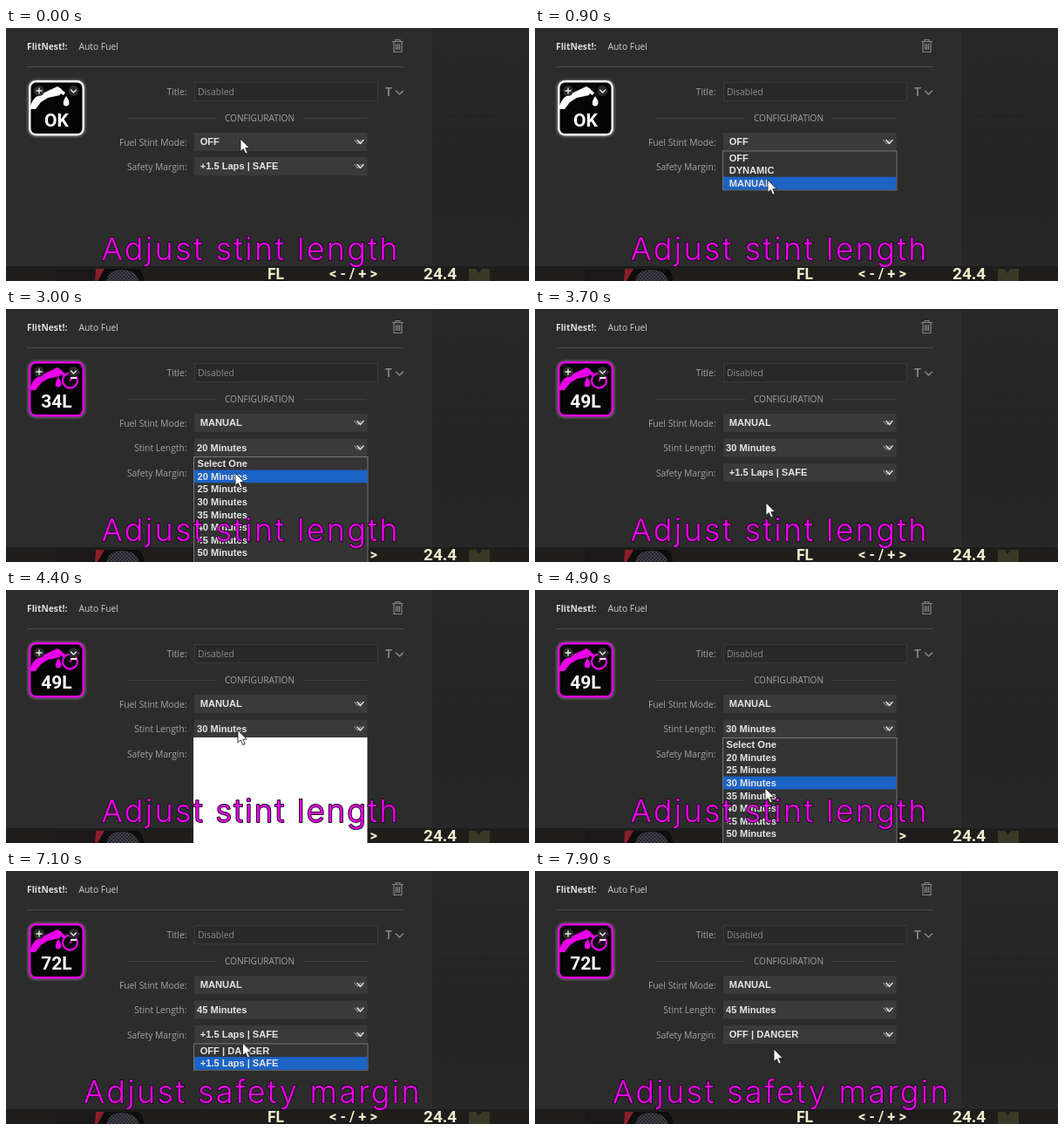
An HTML page for the animation above (8000 ms loop, 600 by 290 pixels).

```html
<!DOCTYPE html>
<html lang="en">
<head>
<meta charset="utf-8">
<title>Stint settings</title>
<style>
  html, body { margin: 0; width: 100%; height: 100%; overflow: hidden; background: #1e1d1c; }
  svg { display: block; width: 600px; height: 290px; }
  .ui { font: 500 10.3px "Open Sans", "Noto Sans", sans-serif; fill: #a4a4a4; }
  .end { text-anchor: end; }
  .mid { text-anchor: middle; }
  .name { font-weight: 700; fill: #dedede; }
  .sel { font: bold 11.1px "Liberation Sans", Arial, sans-serif; fill: #e6e6e6; }
  .hud { font: bold 17.5px Roboto, sans-serif; fill: #efeecb; }
  .key { font: bold 21px Roboto, sans-serif; fill: #fff; text-anchor: middle; }
  .cap { font: 350 36px Inter, sans-serif; letter-spacing: 2.3px; fill: #f000f0;
         stroke: #220a22; stroke-width: 2px; stroke-linejoin: round; paint-order: stroke; }
  .line { fill: none; stroke-linecap: round; stroke-linejoin: round; }
</style>
</head>
<body>
<svg viewBox="0 0 600 290">
  <defs>
    <linearGradient id="side" x1="0" y1="0" x2="0" y2="1">
      <stop offset="0" stop-color="#282828"/>
      <stop offset=".65" stop-color="#252525"/>
      <stop offset="1" stop-color="#272727"/>
    </linearGradient>
    <pattern id="hatch" width="4" height="4" patternUnits="userSpaceOnUse">
      <rect width="4" height="4" fill="#25252a"/>
      <path d="M0 0h2v2h-2zM2 2h2v2h-2z" fill="#3f4048"/>
    </pattern>
    <clipPath id="face"><rect x="28" y="62" width="60" height="60" rx="6"/></clipPath>
    <filter id="soft" x="-20%" y="-20%" width="140%" height="140%"><feGaussianBlur stdDeviation="1"/></filter>
  </defs>

  <!-- backdrop and head-up display -->
  <rect width="600" height="290" fill="#1e1d1c"/>
  <rect x="490" width="110" height="273" fill="url(#side)"/>
  <path d="M490 101h110M490 118h110M490 137h110M490 154h110" stroke="#222"/>
  <rect x="57" y="276" width="45" height="14" fill="#1a1818"/>
  <path d="M103 276h49q6 5 6 14h-56z" fill="#0e0d0e"/>
  <path d="M103 276h10l-8 14h-3z" fill="#8a1f28"/>
  <path d="M115 290q3-13 18-13t20 13z" fill="url(#hatch)"/>
  <path d="M531 290v-14h8l3 5 4-5h9v14z" fill="#3a3928"/>
  <g class="hud">
    <text x="300" y="287.5">FL</text>
    <text x="398.500" y="286.500" class="mid" style="font-size:16.500px">&lt; - / + &gt;</text>
    <text x="479" y="287.500" style="font-size:19px">24.4</text>
  </g>

  <!-- settings panel -->
  <rect width="490" height="273" fill="#2d2c2c"/>
  <path d="M489.500 0V273" stroke="#262626"/>
  <text x="24" y="24.500" class="ui name">FlitNest!:</text>
  <text x="83.500" y="24.500" class="ui" style="fill:#d2d2d2">Auto Fuel</text>
  <g class="line" stroke="#858585" stroke-width="1.200">
    <path d="M443.500 15.500h12M447 15.500v-2h5v2M445 15.500v12h9v-12M447.500 18.500v6M449.500 18.500v6M451.500 18.500v6"/>
    <path d="M447.500 72l4 4 4-4" stroke-width="1.600"/>
  </g>
  <path d="M24 44.500H457" stroke="#4d4c4c"/>
  <text x="207.500" y="77" class="ui end">Title:</text>
  <rect x="216.500" y="62.500" width="210" height="21" fill="#2a2929" stroke="#3a3939"/>
  <text x="220" y="77" class="ui" style="fill:#8b8b8b">Disabled</text>
  <text x="435" y="77.500" class="ui" style="font-size:14px;font-weight:600;fill:#8c8c8c">T</text>
  <path d="M139 103.500H241M341 103.500H414" stroke="#424141"/>
  <text x="291" y="107" class="ui mid" style="font-size:10.100px">CONFIGURATION</text>

  <g id="live"></g>
</svg>
<script>
const LOOP = 8000, STEP = 100, ROW = 14.6, PINK = "#e800e8";
const live = document.getElementById("live");

const MODES = ["OFF", "DYNAMIC", "MANUAL"];
const STINTS = ["Select One", ...Array.from({ length: 8 }, (_, i) => `${20 + i * 5} Minutes`)];
const MARGINS = ["OFF | DANGER", "+1.5 Laps | SAFE"];

// time, x, y of the pointer tip
const PATH = [
  [0, 269, 127], [400, 269, 127], [900, 267, 174], [1300, 267, 175],
  [2000, 265, 160], [2400, 265, 160], [3000, 263, 188], [3400, 265, 222],
  [3700, 265, 222], [4200, 266, 159], [4500, 266, 161], [4900, 264, 227],
  [5300, 262, 264], [6100, 261, 264], [6600, 270, 190], [6900, 270, 190],
  [7300, 273, 204], [7900, 274, 204]
];

// time the list opens, time an option is taken
const MENUS = [
  { from: 300, to: 1300, key: "mode" },
  { from: 2300, to: 3700, key: "stint" },
  { from: 4400, to: 5500, key: "stint" },
  { from: 6800, to: 7500, key: "margin" }
];

function pointer(t) {
  const i = PATH.findIndex(p => p[0] > t);
  if (i < 0) return PATH[PATH.length - 1].slice(1);
  const [a, x0, y0] = PATH[i - 1], [b, x1, y1] = PATH[i];
  let k = (t - a) / (b - a);
  k = k * k * (3 - 2 * k);
  return [x0 + (x1 - x0) * k, y0 + (y1 - y0) * k];
}

const esc = s => s.replace(/</g, "&lt;");
const text = (x, y, s, cls) => `<text x="${x}" y="${y}" class="${cls}">${esc(s)}</text>`;

function field(f) {
  const y = f.y, mid = y + 10;
  return text(207.5, y + 14.5, f.label, "ui end") +
    `<rect x="216" y="${y}" width="198.500" height="21" fill="#3b3a3a"/>` +
    text(f.x, y + 14, f.items[f.pick], "sel") +
    `<g class="line" stroke-width="1.400">
      <path d="M400 ${mid - 1.5}l3.500 4 3.500-4" stroke="#7d7d7d"/>
      <path d="M403 ${mid - 1.5}l3.500 4 3.500-4" stroke="#e4e4e4"/></g>`;
}

function list(f, py, blank) {
  const top = f.y + 21.5, h = f.items.length * ROW + 1;
  if (blank) return `<rect x="215" y="${top - 1}" width="199.500" height="${h}" fill="#fff"/>`;
  const over = Math.floor((py - top) / ROW);
  const lit = f.items[over] ? over : f.pick;
  return `<rect x="215.500" y="${top - .5}" width="199.500" height="${h}" fill="#353434" stroke="#747474"/>` +
    `<rect x="216" y="${top + lit * ROW}" width="198.500" height="${ROW}" fill="#1c63c6"/>` +
    f.items.map((s, i) => text(f.x + (f.x < 220 ? .5 : 0), top + i * ROW + 11.2, s, "sel")).join("");
}

function badge(x, mark) {
  return `<circle cx="${x}" cy="72" r="6" fill="#2b2b2b"/>` +
    `<path d="${mark}" class="line" stroke="#eee" stroke-width="1.300"/>`;
}

function button(label) {
  const on = label !== "OK", ink = on ? PINK : "#fff";
  const clock = `<g class="line" stroke="${ink}"><circle cx="73.500" cy="82" r="8.500" stroke-width="2.300"/>
    <path d="M81 74l2.500-2M73.500 82l3-4" stroke-width="2"/></g>
    <path d="M74 78h7v2h-7z" fill="#eee"/>`;
  const nozzle = `<path d="M27 93q3-15 17-19l15-7 5 3-2 7-14 3-8 5-6 8z" fill="${ink}"/>
    <path d="M60 68l8 6-2 3-7-4z" fill="${ink}"/>
    <path d="M${on ? 60 : 69} 78q5 7 3 10-3 3-6 0-1-4 3-10z" fill="${ink}"/>`;
  return `<rect x="25.500" y="60" width="65" height="64" rx="9" fill="none" stroke="${on ? "#857a85" : "#8a8a8a"}" stroke-width="1.500" filter="url(#soft)"/>
    <rect x="27.300" y="61.300" width="61.400" height="61" rx="7" fill="#050505" stroke="${ink}" stroke-width="2.400"/>
    <g clip-path="url(#face)">${nozzle}${on ? clock : ""}</g>` +
    badge(38, "M35 72h6M38 69v6") + badge(77.5, "M74.500 71l3 3 3-3") +
    text(58, 112.5, label, "key");
}

function draw(t) {
  const [px, py] = pointer(t);
  const manual = t >= 1300;
  const stint = t < 3700 ? 1 : t < 5500 ? 3 : 6;
  const fuel = !manual ? "OK" : { 1: "34L", 3: "49L", 6: "72L" }[stint];
  const fields = {
    mode: { label: "Fuel Stint Mode:", x: 222.7, y: 120, items: MODES, pick: manual ? 2 : 0 },
    margin: { label: "Safety Margin:", x: 222.7, y: manual ? 177 : 148, items: MARGINS, pick: t < 7500 ? 1 : 0 }
  };
  if (manual) fields.stint = { label: "Stint Length:", x: 219, y: 148.5, items: STINTS, pick: stint };

  const menu = MENUS.find(m => t >= m.from && t < m.to);
  const late = t >= 5800;
  live.innerHTML = button(fuel) + Object.values(fields).map(field).join("") +
    (menu ? list(fields[menu.key], py, t < menu.from + STEP) : "") +
    text(late ? 89 : 109.5, 265.5, late ? "Adjust safety margin" : "Adjust stint length", "cap") +
    `<path transform="translate(${px.toFixed(1)} ${py.toFixed(1)})" fill="#fff" stroke="#222" stroke-width=".9"
      d="M0 0V14.500L3.300 11.500 5.700 17 8.200 16 5.800 10.600H10.300Z"/>`;
}

let shown = -1;
const start = performance.now();
function tick() {
  const t = Math.floor(((performance.now() - start) % LOOP) / STEP) * STEP;
  if (t !== shown) draw(shown = t);
  requestAnimationFrame(tick);
}
tick();
</script>
</body>
</html>
```
